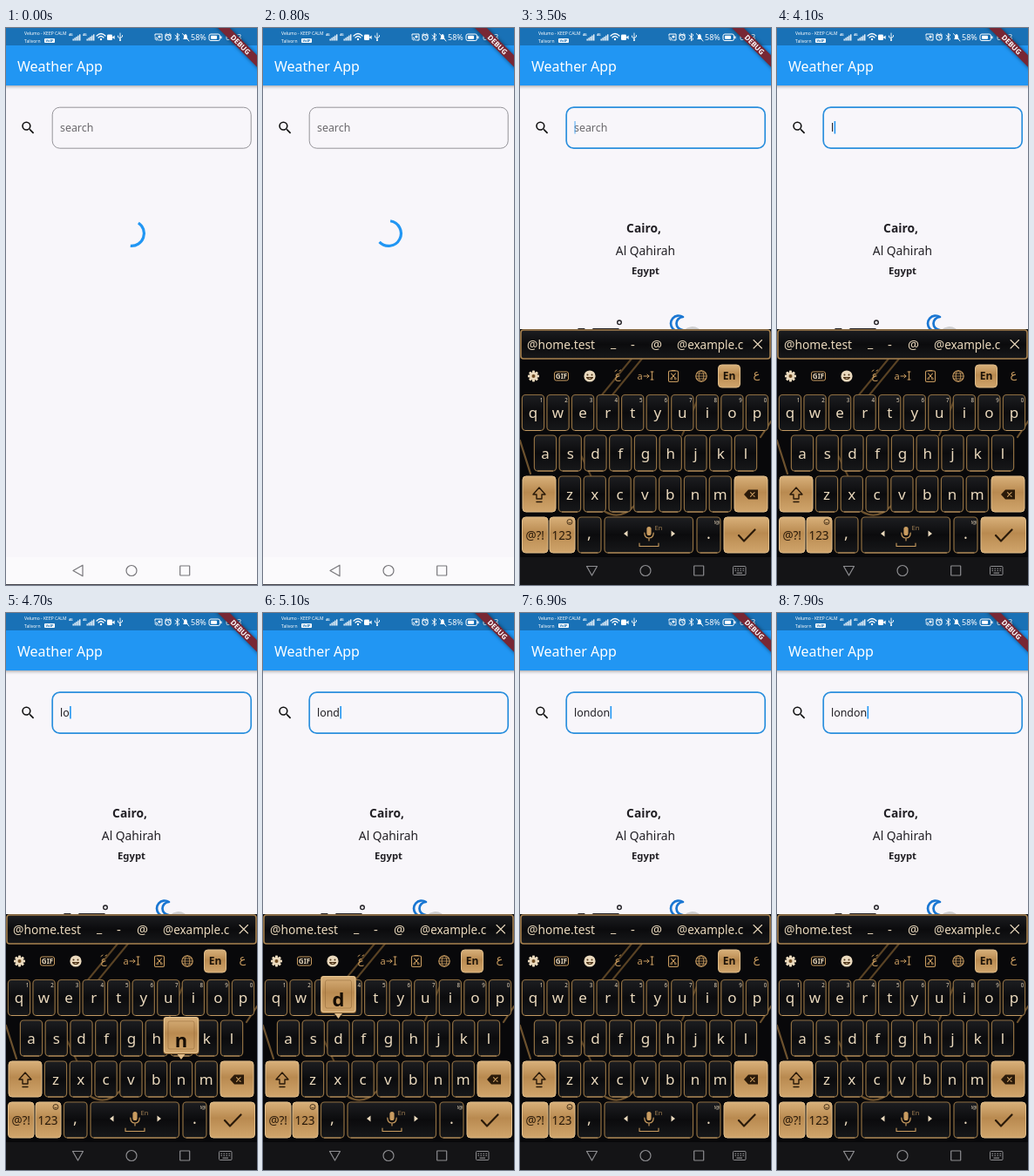
Write an HTML page that moves like this. It is 288x640 px and loops after 8 s.

```html
<!DOCTYPE html>
<html lang="en">
<head>
<meta charset="utf-8">
<title>Weather App</title>
<style>
html, body { margin: 0; width: 100%; height: 100%; overflow: hidden; background: #f8f6fa; }
svg { display: block; width: 288px; height: 640px; font-family: "Noto Sans", "Open Sans", sans-serif; }
.mid { text-anchor: middle; }
.bold { font-weight: 700; }
.ar { font-family: "DejaVu Sans", sans-serif; }
.line { fill: none; stroke-linecap: round; stroke-linejoin: round; }
</style>
</head>
<body>
<svg id="stage" viewBox="0 0 288 640" xmlns="http://www.w3.org/2000/svg"></svg>
<script>
const LOOP = 8000, STEP = 100, LOADED = 1100, FOCUS = 3500;
const BLUE = '#2196f3', INK = '#211f24', CREAM = '#ead9bd', GOLD = '#c99c60';

// Time at which each letter lands in the field
const TYPED = [[4000, 'l'], [4300, 'o'], [4800, 'n'], [5100, 'd'], [5400, 'o'], [6500, 'n']];

const text = (x, y, s, size, fill, cls = '', more = '') =>
  `<text x="${x}" y="${y}" font-size="${size}" fill="${fill}" class="${cls}" ${more}>${s}</text>`;
const rect = (x, y, w, h, r, fill, more = '') =>
  `<rect x="${x}" y="${y}" width="${w}" height="${h}" rx="${r}" fill="${fill}" ${more}/>`;
const line = (d, color, w = 1, more = '') =>
  `<path class="line" d="${d}" stroke="${color}" stroke-width="${w}" ${more}/>`;
const disc = (x, y, r, fill, more = '') => `<circle cx="${x}" cy="${y}" r="${r}" fill="${fill}" ${more}/>`;
const ring = (x, y, r, color, w = 1) => disc(x, y, r, 'none', `stroke="${color}" stroke-width="${w}"`);
const grad = (id, stops) => `<linearGradient id="${id}" x1="0" y1="0" x2="0" y2="1">` +
  stops.map(([o, c]) => `<stop offset="${o}" stop-color="${c}"/>`).join('') + '</linearGradient>';

function signal(x) {
  let s = text(x, 9, '4G', 3.6, '#fff', 'bold');
  for (let i = 0; i < 5; i++) s += rect(x + 4.5 + i * 1.9, 12.5 - i * 1.3, 1.3, 2 + i * 1.3, 0, '#fff');
  return s;
}

function statusBar() {
  const w = '#fff';
  return rect(0, 0, 288, 20, 0, '#1971b6') +
    text(21, 8.2, 'Velumo - KEEP CALM', 5, w) +
    text(21, 17, 'Talivorn', 5, w) +
    rect(44, 12, 12, 5, 1, w) + text(50, 16.2, 'VoIP', 4, '#1971b6', 'mid bold') +
    signal(72) + signal(88) +
    line('M104 9q5-5 10 0M106 11q3-3 6 0', w, 1.2) + disc(109, 13, 1.2, w) +
    rect(116, 7.5, 6, 6.5, 1.2, w) + `<path d="M122 10.5l2.6-2v4.5l-2.6-2z" fill="${w}"/>` +
    line('M131 6v8M128.5 9v1.5l2.5 1.5M133.5 8.5v1.5l-2.5 1.5', w, .9) + disc(131, 14, 1, w) +
    line('M171 9V7h8v7h-3M171 10.5q3.5 0 3.5 3.5M171 12.3q1.7 0 1.7 1.7', w, 1) + disc(176, 10, 1.6, w) +
    ring(186, 10.8, 3.2, w, 1.1) + line('M186 9v2l1.4 .8M182.4 8l2-1.7M189.6 8l-2-1.7', w, .9) +
    line('M194 8.2l5 4.4-2.5 2V6.2l2.5 2-5 4.4', w, .9) +
    `<path d="M203 13q1.2-1 1.2-3.5Q204.2 7 206 7t1.8 2.5Q207.8 12 209 13z" fill="${w}"/>` +
    line('M202.5 6.5l7.5 8.5', w, .9) +
    text(212, 14, '58%', 9, w) +
    rect(233, 7, 12.5, 7.5, 2, 'none', `stroke="${w}"`) + rect(235, 8.8, 7, 4, .8, w) +
    rect(246.3, 9.2, 1.3, 3, .5, w) +
    text(252, 14, '6:23', 9.2, w);
}

const banner = () => `<g transform="translate(269 19) rotate(45)">` +
  rect(-45, -4.8, 90, 9.6, 0, '#000', 'opacity=".5" filter="url(#soft)"') +
  rect(-45, -4.8, 90, 9.6, 0, '#782734') +
  text(0, 3, 'DEBUG', 8.2, '#fff', 'mid bold') + '</g>';

function page() {
  return rect(0, 0, 288, 640, 0, '#f8f6fa') +
    rect(-4, 20, 296, 46.5, 0, '#000', 'opacity=".45" filter="url(#soft)"') +
    rect(0, 20, 288, 46, 0, BLUE) +
    text(13, 50, 'Weather App', 16, '#fff') +
    `<path transform="translate(15.8 105) scale(.8)" fill="#111" d="M15.5 14h-.79l-.28-.27A6.47 6.47 0 0 0 16 9.5 6.5 6.5 0 1 0 9.5 16c1.61 0 3.09-.59 4.23-1.57l.27.28v.79l5 4.99L20.49 19l-4.99-5zm-6 0a4.5 4.5 0 1 1 0-9 4.5 4.5 0 0 1 0 9z"/>` +
    rect(53.2, 91.2, 228, 47, 8.5, 'none', 'id="field"') +
    text(62, 118.8, 'search', 12.4, '#6a686c', '', 'id="entry"') +
    rect(62, 107, 1.6, 14.5, 0, BLUE, 'id="caret"');
}

function weather() {
  return text(142, 235, 'Cairo,', 13.8, INK, 'mid bold') +
    text(144, 260.5, 'Al Qahirah', 13.8, INK, 'mid') +
    text(144, 282.8, 'Egypt', 11.3, INK, 'mid bold') +
    text(50, 387, '17', 59, INK, 'bold', 'letter-spacing="-2"') +
    ring(114, 338.3, 2.3, INK, 1.4) +
    line('M187 332A9 9 0 1 0 187 347A7.5 7.5 0 0 1 187 332Z', '#1976d2', 2.7) +
    line('M186 369A7 7 0 0 1 186.5 355.5A11.2 11.2 0 0 1 208.5 353A8.3 8.3 0 0 1 211.5 369Z', '#cfcfd1', 3.3) +
    text(195, 402, 'Partly cloudy', 13.8, INK, 'mid bold');
}

const homeAndRecent = c => ring(144, 623.5, 6, c, 1.2) +
  rect(199.7, 618, 11, 11, .5, 'none', `stroke="${c}" stroke-width="1.2"`);

const lightNav = () => rect(0, 608, 288, 32, 0, '#fbfafc') + rect(0, 639, 288, 1, 0, '#44434a') +
  line('M77 623.5L88 617.2V629.8Z', '#77767a', 1.2) + homeAndRecent('#77767a');

function darkNav() {
  const c = '#8d8d90';
  let s = rect(0, 608, 288, 32, 0, '#141416') + line('M76.5 618.5H88.5L82.5 629Z', c, 1.2) +
    homeAndRecent(c) + rect(244.5, 618.5, 14.5, 10, 1, 'none', `stroke="${c}"`);
  for (let i = 0; i < 8; i++) s += rect(246.5 + i % 4 * 3, 620.7 + (i >> 2) * 2.2, 1.4, 1.2, 0, c);
  return s + rect(248.5, 625.6, 6.5, 1.2, 0, c);
}

const caps = {};
const darkKey = (x, y, w, h = 41) =>
  rect(x, y, w, h, 4, 'url(#dark)', 'stroke="#8f6f42" stroke-width="1.2"') +
  line(`M${x + 4} ${y + h}h${w - 8}`, '#c39a63', 1);
const goldKey = (x, y, w, h = 41) =>
  rect(x, y, w, h, 4, 'url(#gold)', 'stroke="#e0bd8a" stroke-width="1"');

function letters(row, x0, gap, y) {
  return [...row].map((ch, i) => {
    const x = x0 + i * gap;
    caps[ch] = [x, y + 20.5];
    return darkKey(x - 12.6, y, 25.2) + text(x, y + 26.5, ch, 17, CREAM, 'mid');
  }).join('');
}

function toolbar() {
  let s = disc(15.5, 400, 4.6, CREAM);
  for (let a = 0; a < 360; a += 45) s += rect(14, 393.5, 3, 4, .8, CREAM, `transform="rotate(${a} 15.5 400)"`);
  s += disc(15.5, 400, 2, '#6d4a22');
  s += rect(39.5, 395, 16, 10, 2, 'none', `stroke="${GOLD}"`) + text(47.5, 403.3, 'GIF', 8, CREAM, 'mid bold');
  s += disc(80, 400, 6.6, CREAM) + disc(77.5, 398.5, 1, '#4a3014') + disc(82.5, 398.5, 1, '#4a3014') +
    line('M76.5 401.5q3.5 4 7 0z', '#4a3014', 1.2);
  s += text(112, 403, 'ع', 12, GOLD, 'mid ar') + line('M109 394.5l2-1.5M114 394l1.5-1', GOLD, 1);
  s += text(134.5, 403.5, 'a', 11, GOLD) + line('M142 400h6M146 398l2 2-2 2M150 395h3M151.5 395v9M150 404h3', GOLD, 1);
  s += rect(170.5, 394, 11, 12.5, 1.5, 'none', `stroke="${GOLD}" stroke-width="1.1"`) +
    line('M174 393.5h4M173.5 397l4.5 5M178.5 397l-4.5 5', GOLD, 1.1) +
    ring(173.6, 403, 1, GOLD, .8) + ring(178.4, 403, 1, GOLD, .8);
  s += ring(208, 400, 6.2, GOLD, 1.1) + line('M202 400h12M203 397h10M203 403h10', GOLD, .8) +
    `<ellipse cx="208" cy="400" rx="2.8" ry="6.2" fill="none" stroke="${GOLD}" stroke-width=".9"/>`;
  s += goldKey(227.5, 387, 25, 26) + text(240, 404, 'En', 12, '#1c1208', 'mid bold');
  return s + text(271.5, 402, 'ع', 13, GOLD, 'mid ar');
}

function keyboard() {
  let s = rect(0, 346, 288, 262, 0, '#08080a');
  s += line('M92 424L128 380M104 424L140 380M60 470L82 516M186 468L206 422', '#7d5c30', 2, 'opacity=".7"') +
    line('M0 474L12 512M276 470L288 452M98 556Q116 566 132 548', '#a47a42', 2.2, 'opacity=".65"');
  s += rect(1, 347, 286, 33, 3, 'url(#dark)', 'stroke="#a98350" stroke-width="1.6"');
  s += text(8, 368.5, '@home.test', 13.8, CREAM) + text(104, 367, '_', 14, CREAM) +
    text(127, 368.5, '-', 15, CREAM) + text(150, 368.5, '@', 14.5, CREAM) +
    text(180, 368.5, '@example.c', 13.5, CREAM) + line('M268 358.5l9.5 9.5M277.5 358.5l-9.5 9.5', CREAM, 1.1);
  s += toolbar();
  s += letters('qwertyuiop', 15, 28.55, 421.5) + letters('asdfghjkl', 29, 28.75, 468) +
    letters('zxcvbnm', 57, 28.8, 515);
  for (let i = 0; i < 10; i++) s += text(24.5 + i * 28.55, 429.5, (i + 1) % 10, 6.2, CREAM, 'mid');

  const dk = '#2a1a0a';
  s += goldKey(3, 515, 38) + line('M22 528l-7 8h4v5h6v-5h4zM19 544.5h6', dk, 1.4);
  s += goldKey(246, 515, 38) + `<path d="M257 536l5-5.5h11v11h-11z" fill="${dk}"/>` +
    line('M264.5 533.7l4.6 4.6M269.1 533.7l-4.6 4.6', GOLD, 1.1);
  s += goldKey(2.5, 562, 29.5) + text(17.2, 588, '@?!', 13.5, dk, 'mid');
  s += goldKey(34, 562, 29) + text(48, 588, '123', 13.5, dk, 'mid') +
    ring(57, 567.5, 3, dk, .8) + line('M55.6 568.3q1.4 1.4 2.8 0', dk, .7);
  s += darkKey(66.5, 562, 26.5) + text(79.5, 587, ',', 18, CREAM, 'mid');
  s += darkKey(97, 562, 101.5) + text(159, 577, 'En', 7.5, '#9d7d50', 'mid') +
    `<path d="M123.5 577.5v7l-4.5-3.5zM173.5 577.5v7l4.5-3.5z" fill="${CREAM}"/>` +
    rect(145.4, 573, 5.2, 10, 2.6, GOLD) +
    line('M142.8 580q0 6 5.2 6t5.2-6M148 586v3', GOLD, 1.2) + line('M137 592v3.5h22V592', GOLD, 1.1);
  s += darkKey(203, 562, 27) + text(216.5, 587, '.', 18, CREAM, 'mid') + text(226, 570, '!@', 6, CREAM, 'mid');
  s += goldKey(234, 562, 51.5) + line('M251 583l6 6.5 12.5-13', dk, 2.2);
  return s + darkNav();
}

const popup = () => '<g id="popup">' +
  `<path d="M-6 19h12l-6 8z" fill="#e0bd8a"/>` +
  rect(-20.5, -22, 41, 43, 3, '#7a5427') +
  rect(-19.5, -21.5, 39, 41, 3, 'url(#gold)', 'stroke="#e6c592" stroke-width="1.2"') +
  rect(-15, -17, 30, 32, 2, 'none', 'stroke="#8b6434" stroke-width=".8" opacity=".6"') +
  text(0, 13, '', 22, '#160d04', 'mid', 'id="popChar" font-weight="600"') + '</g>';

const $ = id => document.getElementById(id);
$('stage').innerHTML = '<defs>' +
  grad('gold', [[0, '#d8b07a'], [.45, '#b98a50'], [1, '#d0a56c']]) +
  grad('dark', [[0, '#1d1e21'], [.5, '#0b0b0d'], [1, '#17181a']]) +
  '<filter id="soft" x="-20%" y="-100%" width="140%" height="300%"><feGaussianBlur stdDeviation="2"/></filter></defs>' +
  page() + line('', BLUE, 3.2, 'id="spin" style="stroke-linecap:butt"') +
  `<g id="weather">${weather()}</g>` + lightNav() + statusBar() + banner() +
  `<g id="keys">${keyboard()}${popup()}</g>`;

// cubic-bezier(.4, 0, .2, 1)
function ease(x) {
  if (x <= 0) return 0;
  if (x >= 1) return 1;
  let lo = 0, hi = 1, s;
  for (let i = 0; i < 24; i++) {
    s = (lo + hi) / 2;
    const r = 1 - s;
    if (1.2 * r * r * s + .6 * r * s * s + s * s * s < x) lo = s; else hi = s;
  }
  return s * s * (3 - 2 * s);
}

// Material spinner: head runs ahead, tail catches up, all of it turning
function arc(t) {
  const u = t / 1333 % 1, turn = t / 2222 % 1, pi = Math.PI;
  const head = ease(u * 2) * 1.5 * pi, tail = ease(u * 2 - 1) * 1.5 * pi;
  const a = -pi / 2 + tail + turn * 2 * pi + u * pi / 2;
  const sweep = Math.max(head - tail, .01);
  const at = k => `${144 + 14.4 * Math.cos(k)} ${236 + 14.4 * Math.sin(k)}`;
  return `M${at(a)}A14.4 14.4 0 ${sweep > pi ? 1 : 0} 1 ${at(a + sweep)}`;
}

const show = (el, on) => { el.style.display = on ? '' : 'none'; };

function drawField(t, focused) {
  const done = TYPED.filter(([at]) => at <= t);
  const word = done.map(([, ch]) => ch).join('');
  const entry = $('entry');
  entry.textContent = word || 'search';
  entry.setAttribute('fill', word ? INK : '#6a686c');
  $('field').setAttribute('stroke', focused ? '#2a8fdd' : '#8a888e');
  $('field').setAttribute('stroke-width', focused ? 1.7 : .9);

  const since = word ? done[done.length - 1][0] : FOCUS - 900;
  const d = (t - since) % 1000;
  const glow = d < 500 ? 1 : d < 600 || d >= 900 ? .5 : 0;
  $('caret').setAttribute('opacity', focused ? glow : 0);
  $('caret').setAttribute('x', 62 + (word ? entry.getComputedTextLength() + .4 : .3));
}

function drawPopup(t) {
  const hit = TYPED.find(([at]) => t >= at - 150 && t < at + 50);
  show($('popup'), hit);
  if (!hit) return;
  const [x, y] = caps[hit[1]];
  $('popChar').textContent = hit[1];
  $('popup').setAttribute('transform', `translate(${Math.min(x, 266)} ${y - 49.5})`);
}

function draw(t) {
  const focused = t >= FOCUS;
  show($('spin'), t < LOADED);
  show($('weather'), t >= LOADED);
  show($('keys'), focused);
  if (t < LOADED) $('spin').setAttribute('d', arc(3550 + t));
  drawField(t, focused);
  drawPopup(t);
}

const start = performance.now();
function tick() {
  const t = (performance.now() - start) % LOOP;
  draw(Math.floor(t / STEP) * STEP);
  requestAnimationFrame(tick);
}
tick();
</script>
</body>
</html>
```
